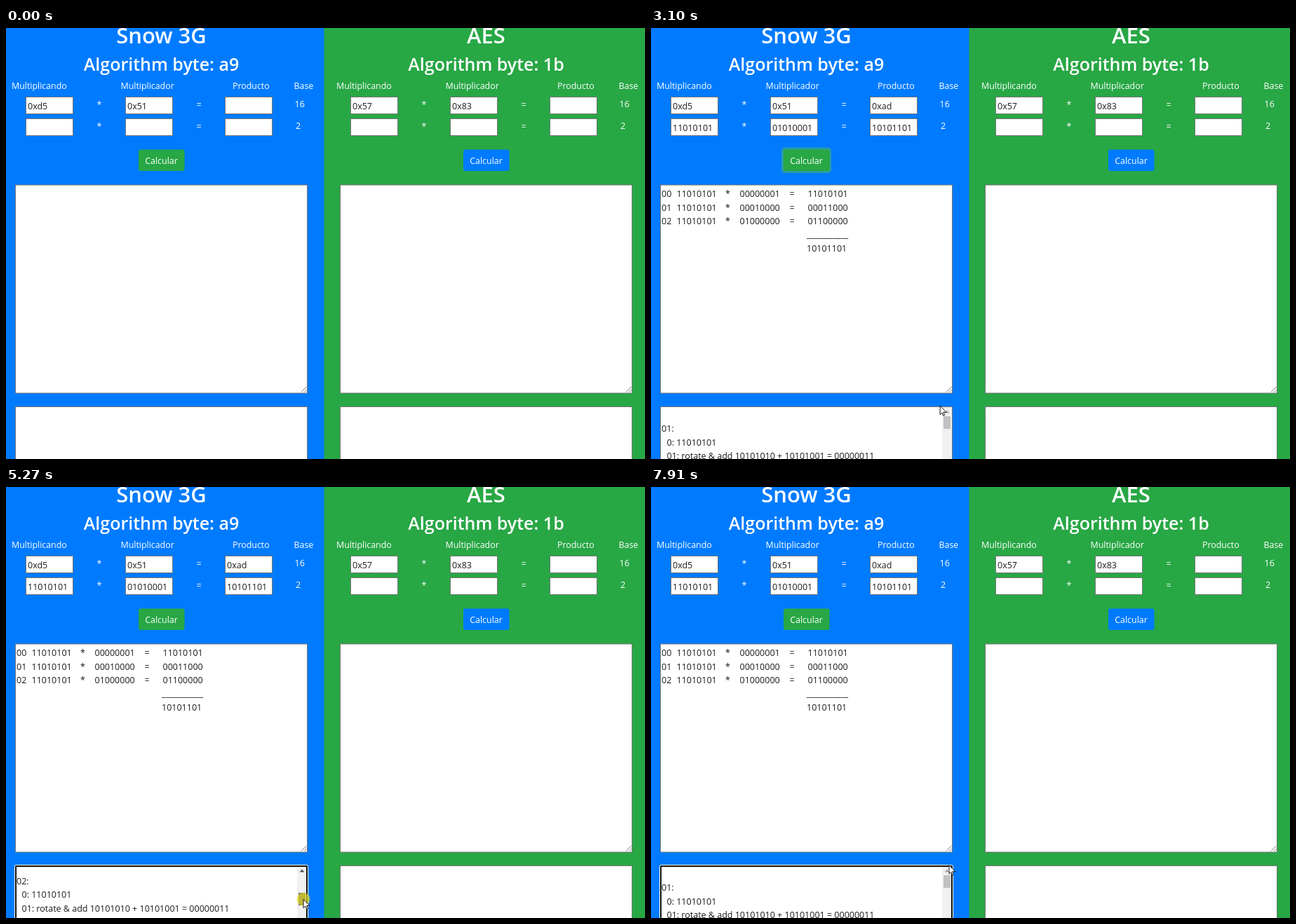
Animation, 911 px wide and 615 px high, one loop 7.99 s. Source, as an HTML page:

```html
<!DOCTYPE html>
<html lang="es">
<head>
<meta charset="utf-8">
<title>Snow 3G / AES</title>
<style>
  html, body { margin: 0; width: 100%; height: 100%; overflow: hidden; background: #007bff; }
  svg { display: block; width: 911px; height: 615px; font: 12.5px "Open Sans", "Noto Sans", sans-serif; }
  text { fill: #fff; white-space: pre; }
  .dark text, text.dark { fill: #1b1b1b; }
  .head { font-weight: 600; text-anchor: middle; }
  .label { font-size: 12.4px; }
  .mid { text-anchor: middle; }
  .box { fill: #fff; stroke: #767676; }
</style>
</head>
<body>
<svg id="stage" viewBox="0 0 911 615">
  <defs>
    <clipPath id="view"><rect x="15" y="541" width="400" height="74"/></clipPath>
  </defs>
  <rect width="453.5" height="615" fill="#007bff"/>
  <rect x="453.5" width="457.5" height="615" fill="#28a745"/>
  <rect id="glow" x="186" y="170.5" width="71" height="36.5" rx="5" fill="#48b461" opacity=".6"/>
  <g id="left"></g>
  <g id="right" transform="translate(463 0)"></g>
  <g id="result" class="dark"></g>
  <g id="steps" class="dark" clip-path="url(#view)"><g id="log"></g></g>
  <g id="bar">
    <rect x="415" y="541" width="14" height="74" fill="#f1f1f1"/>
    <path id="up" d="M418.5 549.5L422 545.5L425.5 549.5Z"/>
    <rect id="thumb" x="417" y="554" width="10" height="18"/>
  </g>
  <g id="ring" fill="none">
    <rect x="12.5" y="539.5" width="418" height="90" rx="2" stroke="#fff"/>
    <rect x="14" y="541" width="415" height="90" rx="1" stroke="#101010" stroke-width="2"/>
  </g>
  <g id="mouse">
    <circle id="press" r="9.5" fill="#e8de10" opacity=".62"/>
    <path id="arrow" d="M0 0V12.6L2.8 9.9L4.7 14.2L6.6 13.4L4.7 9.2H8.8Z" fill="#fff" stroke="#000" stroke-width=".9"/>
    <path id="beam" d="M-3 -6.5H-1L0 -5.5L1 -6.5H3M0 -5.5V5.5M-3 6.5H-1L0 5.5L1 6.5H3" fill="none" stroke="#222" stroke-width="1.1"/>
    <path id="hand" d="M-1.2 9V1Q0 -1 1.2 1V6L6.5 7.2Q8 7.6 7.8 9.5L6.8 15H0L-4 9.6Q-4 7.4 -1.2 9Z" fill="#fff" stroke="#000" stroke-width=".9"/>
  </g>
</svg>
<script>
const NS = 'http://www.w3.org/2000/svg';
const $ = id => document.getElementById(id);

function add(parent, tag, attrs, text) {
  const el = document.createElementNS(NS, tag);
  for (const k in attrs) el.setAttribute(k, attrs[k]);
  if (text !== undefined) el.textContent = text;
  parent.append(el);
  return el;
}
const write = (parent, x, y, text, cls = '') => add(parent, 'text', { x, y, class: cls }, text);
const bits = n => n.toString(2).padStart(8, '0');

const COLS = [28.5, 170.5, 312.5];
const ROWS = [98.5, 129.5];

function panel(root, title, byte, inputs, btn) {
  write(root, 221.5, 22, title, 'head').style.fontSize = '31px';
  write(root, 221.5, 61, 'Algorithm byte: ' + byte, 'head').style.fontSize = '25px';
  [['Multiplicando', 8], ['Multiplicador', 163.5], ['Producto', 323], ['Base', 410.5]]
    .forEach(([s, x]) => write(root, x, 87, s, 'label'));
  ROWS.forEach((y, i) => {
    COLS.forEach(x => add(root, 'rect', { x, y, width: 67, height: 24, class: 'box' }));
    write(root, 133, y + 15, '*', 'mid');
    write(root, 275, y + 15, '=', 'mid');
    write(root, i ? 413 : 411.5, y + 14.5, i ? '2' : '16');
  });
  inputs.forEach((s, i) => write(root, COLS[i] + 2.5, 116, s, 'dark'));
  add(root, 'rect', { x: 189, y: 173.5, width: 65.5, height: 30.5, rx: 3, fill: btn, class: 'btn' });
  write(root, 221.5, 193.5, 'Calcular', 'label mid');
  add(root, 'rect', { x: 13.5, y: 224, width: 416, height: 297, class: 'box' });
  add(root, 'path', { d: 'M421 519.5L428.5 512M425.5 519.5L428.5 516.5', stroke: '#666', 'stroke-width': .9 });
  add(root, 'rect', { x: 13.5, y: 540.5, width: 416, height: 297, class: 'box' });
}
panel($('left'), 'Snow 3G', 'a9', ['0xd5', '0x51'], '#28a745');
panel($('right'), 'AES', '1b', ['0x57', '0x83'], '#007bff');

// Multiplication by shifts in the field, with its step log
const POLY = 0xa9, A = 0xd5, B = 0x51, PITCH = 19.5;
const log = [];
let product = 0, row = 0;
for (let bit = 0; bit < 8; bit++) {
  if (!(B >> bit & 1)) continue;
  const name = '0' + row;
  if (row) log.push('', name + ':', '  0: ' + bits(A));
  let v = A;
  for (let k = 1; k <= bit; k++) {
    const shifted = v << 1 & 255;
    const carry = v > 127;
    v = carry ? shifted ^ POLY : shifted;
    log.push(`  0${k}: rotate ` + (carry ? `& add ${bits(shifted)} + ${bits(POLY)} = ` : '') + bits(v));
  }
  product ^= v;
  [[name, 15], [bits(A), 36.5], ['*', 106], [bits(1 << bit), 126.5], ['=', 197.5], [bits(v), 223.5]]
    .forEach(([s, x]) => write($('result'), x, 241 + row * PITCH, s));
  row++;
}
write($('result'), 222, 298.5, '_'.repeat(11)).style.fontSize = '12px';
write($('result'), 222, 319, bits(product));
write($('result'), COLS[2] + 2.5, 116, '0x' + product.toString(16));
[A, B, product].forEach((n, i) => write($('result'), COLS[i] + 2.5, 147, bits(n)));
log.forEach((s, i) => write($('log'), s[0] === ' ' ? 22.5 : 15, 556.5 + i * PITCH, s.trim()));

const LOOP = 7990, ENTER = 220, CLICK = 1080, GRAB = 3490, DROP = 7560;
const PATH = [
  [220, 900, 625], [400, 730, 585], [560, 615, 515], [680, 543, 448], [940, 226, 192],
  [1190, 224, 190], [1440, 290, 340], [1560, 322, 400], [1680, 350, 428], [1850, 392, 498],
  [2090, 397, 505], [2780, 399, 507], [3320, 421, 561], [3490, 422, 563.2], [4420, 422.5, 563.2],
  [5270, 424, 563.2], [6820, 425.5, 563.2], [7560, 426, 563.2], [7910, 425, 539.5], [7990, 425, 539.5]
];
const SCROLL = [
  [3490, 0], [3710, 9], [3950, 21], [4420, 64], [4890, 116], [5270, 145.5],
  [5740, 150], [6510, 150], [6820, 104.5], [7280, 24], [7480, 0]
];

function at(keys, t, col = 1) {
  if (t <= keys[0][0]) return keys[0][col];
  for (let i = 1; i < keys.length; i++) {
    const a = keys[i - 1], b = keys[i];
    if (t < b[0]) return a[col] + (b[col] - a[col]) * (t - a[0]) / (b[0] - a[0]);
  }
  return keys[keys.length - 1][col];
}
const show = (id, on) => { $(id).style.display = on ? '' : 'none'; };
const inside = (x, y, l, t, r, b) => x > l && x < r && y > t && y < b;
const button = $('left').querySelector('.btn');

function draw(t) {
  const s = at(SCROLL, t), offset = s * .172;
  const x = at(PATH, t, 1), y = at(PATH, t, 2) + offset;
  const done = t >= CLICK, focus = t >= GRAB, drag = focus && t < DROP;

  ['result', 'steps', 'bar'].forEach(id => show(id, done));
  show('glow', done && !focus);
  show('ring', focus);
  $('log').setAttribute('transform', `translate(0 ${-s})`);
  $('thumb').setAttribute('y', 554 + offset);
  $('thumb').setAttribute('fill', drag ? '#787878' : '#c1c1c1');
  $('up').setAttribute('fill', s > 0 ? '#505050' : '#a3a3a3');

  const overBtn = inside(x, y, 189, 173, 254, 204);
  const overText = [0, 463].some(d =>
    inside(x - d, y, 14, 224, 429, 520) || inside(x - d, y, 14, 541, d ? 429 : 415, 615));
  button.setAttribute('fill', overBtn ? '#218838' : '#28a745');
  show('mouse', t >= ENTER);
  show('press', drag || (t >= CLICK - 60 && t < CLICK + 60));
  show('hand', overBtn);
  show('beam', !drag && overText);
  show('arrow', !overBtn && (drag || !overText));
  $('mouse').setAttribute('transform', `translate(${x} ${y})`);
}

function tick() {
  draw(performance.now() % LOOP);
  requestAnimationFrame(tick);
}
tick();
</script>
</body>
</html>
```
